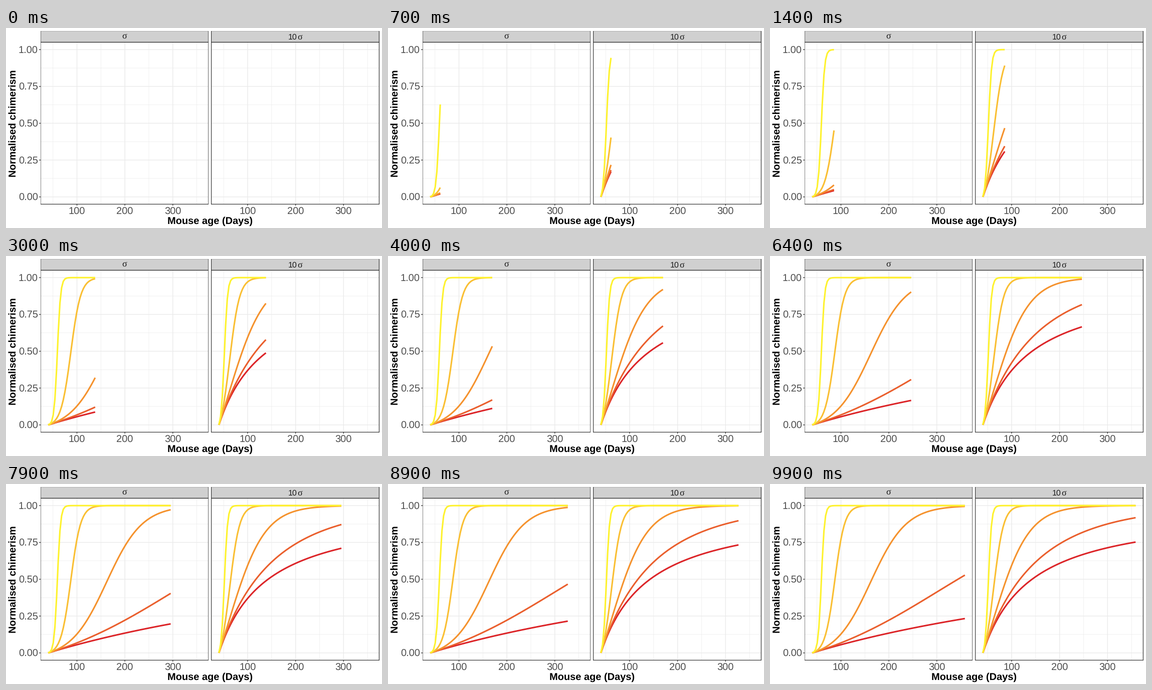
These frames come from a looping animation (750x400 px, 10 s). A matplotlib script:

```python
import numpy as np
import matplotlib.pyplot as plt
from matplotlib.animation import FuncAnimation
from matplotlib.patches import Rectangle

W, H, DPI = 750, 400, 100
PT = 72 / DPI
FRAMES = 100

plt.rcParams["font.family"] = "Liberation Sans"
plt.rcParams["text.hinting"] = "none"

fig = plt.figure(figsize=(W / DPI, H / DPI), dpi=DPI, facecolor="white")
ax = fig.add_axes([0, 0, 1, 1])
ax.set_xlim(0, W)
ax.set_ylim(H, 0)
ax.axis("off")

# Layout in pixels
PANEL_W = 335.05
LEFTS = (68.9, 409.45)
STRIP_TOP, TOP, BOTTOM = 5.5, 28.5, 352.5
THIN, THICK = 0.71, 1.42
DARK, GRID = "#333333", "#ebebeb"

# Model: twice-weekly ages, influx rate per panel, net growth per curve
ages = 40 + 3.5 * np.arange(92)
shown_at = np.rint(np.arange(92) * (FRAMES - 1) / 91)
INFLUX = (0.000985, 0.00985)
GROWTH = (-0.0002, 0.0068, 0.0268, 0.0968, 0.2968)
COLORS = ("#dc2428", "#ea5e2c", "#f5922d", "#fabf33", "#fef22e")

span = ages[-1] - ages[0]


def px(age, left):
    return left + (age - ages[0] + 0.05 * span) / (1.1 * span) * PANEL_W


def py(value):
    return BOTTOM - (value + 0.05) / 1.1 * (BOTTOM - TOP)


def chimerism(influx, growth):
    odds = influx * np.expm1(growth * (ages - ages[0])) / growth
    return odds / (1 + odds)


def segment(x, y, color, width, z):
    ax.plot(x, y, color=color, lw=width * PT, solid_capstyle="butt",
            snap=False, zorder=z)


def box(x, y, w, h, fill, z):
    rect = Rectangle((x, y), w, h, facecolor=fill, edgecolor=DARK,
                     lw=THICK * PT, snap=False, zorder=z)
    ax.add_patch(rect)
    rect.set_clip_path(Rectangle((x, y), w, h, transform=ax.transData))


def label(x, y, text, size, color, ha="center", **kw):
    ax.text(x, y, text, fontsize=size * PT, color=color, ha=ha,
            va="baseline", **kw)


def draw_panel(left):
    right = left + PANEL_W
    for ticks_x, ticks_y, width, z in (
        ((50, 150, 250, 350), (0.125, 0.375, 0.625, 0.875), THIN, 1),
        ((100, 200, 300), (0, 0.25, 0.5, 0.75, 1), THICK, 2),
    ):
        for v in ticks_y:
            segment([left, right], [py(v)] * 2, GRID, width, z)
        for v in ticks_x:
            segment([px(v, left)] * 2, [TOP, BOTTOM], GRID, width, z)
    box(left, TOP, PANEL_W, BOTTOM - TOP, "none", 20)
    box(left, STRIP_TOP, PANEL_W, TOP - STRIP_TOP, "#d0d0d0", 20)
    for v in (100, 200, 300):
        x = px(v, left)
        segment([x, x], [BOTTOM, BOTTOM + 2.75], DARK, THICK, 3)
        label(x, 373.2, str(v), 20, "#4d4d4d")


for left in LEFTS:
    draw_panel(left)

for v in (0, 0.25, 0.5, 0.75, 1):
    segment([LEFTS[0] - 2.75, LEFTS[0]], [py(v)] * 2, DARK, THICK, 3)
    label(63.9, py(v) + 7.2, f"{v:.2f}", 20, "#4d4d4d", ha="right")

INK = "#1a1a1a"
label(236.4, 21, "σ", 18, INK, family="Liberation Serif", zorder=21)
label(563.2, 22.8, "10", 16, INK, ha="left", zorder=21)
label(581, 22.8, "σ", 18, INK, ha="left", family="Liberation Serif", zorder=21)
label(406.6, 392, "Mouse age (Days)", 20, "black", weight="bold")
label(20, 190.8, "Normalised chimerism", 20, "black", weight="bold",
      rotation=90, rotation_mode="anchor")

curves = []
for left, influx in zip(LEFTS, INFLUX):
    for i, (growth, color) in enumerate(zip(GROWTH, COLORS)):
        line, = ax.plot([], [], color=color, lw=3.1 * PT, zorder=5 + i,
                        solid_capstyle="butt", solid_joinstyle="round")
        curves.append((line, left, chimerism(influx, growth)))


def update(frame):
    seen = shown_at <= frame
    tip = np.interp(frame, shown_at, ages)
    x = np.append(ages[seen], tip)
    if tip == ages[seen][-1]:
        x = x[:-1]
    for line, left, values in curves:
        y = np.interp(x, ages, values)
        if frame == 0:
            line.set_data([], [])
        else:
            line.set_data(px(x, left), py(y))
    return [c[0] for c in curves]


anim = FuncAnimation(fig, update, frames=FRAMES, interval=100, repeat=True,
                     repeat_delay=0, blit=False)
plt.show()
```
